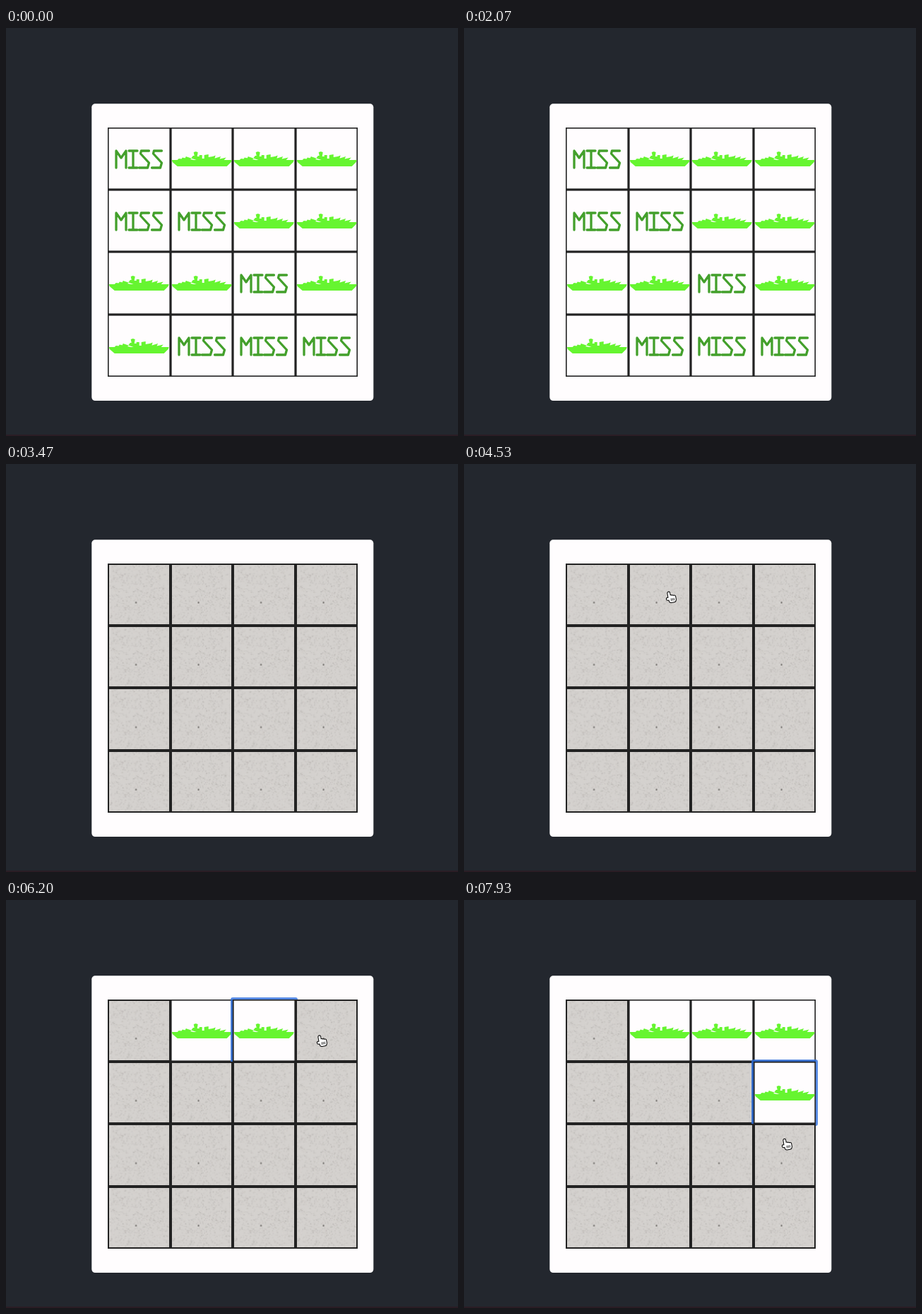
Write an HTML page with a canvas that moves like this. It is 640 by 578 pixels and loops after 8 s.

```html
<!DOCTYPE html>
<html lang="en">
<head>
<meta charset="utf-8">
<title>Battleship board</title>
<style>
  html, body { margin: 0; width: 100%; height: 100%; overflow: hidden; background: #23272e; }
  canvas { display: block; }
</style>
</head>
<body>
<canvas id="stage" width="640" height="578"></canvas>
<script>
const ctx = document.getElementById('stage').getContext('2d');
const LOOP = 8000, FPS = 15;
const LEFT = 144.4, TOP = 140.6, PITCH = 88.4, BORDER = 1.6;
const WHITE = '#fffdfe';

// M = miss, S = ship
const BOARD = ['MSSS', 'MMSS', 'SSMS', 'SMMM'];

// Tiles are uncovered at a steady rhythm along the top row, then down
const COVER_AT = 3460, FIRST_CLICK = 4795, CLICK_GAP = 733;
const ROUTE = ['0,1', '0,2', '0,3', '1,3'];
const clickTime = i => FIRST_CLICK + i * CLICK_GAP;

// The pointer enters, settles on a tile, then glides on after each click
const ENTER_AT = 3920, SETTLE_AT = 4300, GLIDE = 230, PAUSE = 150;
const STOPS = [[183, 7], [358, 195], [286, 181], [341, 194], [440, 192], [449, 266], [450, 338.5]];
const DEPARTURES = [ENTER_AT, SETTLE_AT, ...ROUTE.map((_, i) => clickTime(i) + PAUSE)];

function makeShip() {
  const hull = 'M0 12 H85 L84 15 L78 21 H8 L1 15 Z ';
  const bridge = 'M26 12 L30 6 H32 L31 1 L34 0 L37 1 L36 7 H39 V5 H43 V10 H46 V5 L52 4 V8 L58 7 V12 Z ';
  let guns = '';
  for (let i = 0; i < 3; i++) {
    guns += `M${45 + 8 * i} 12 L${62 + 7.5 * i} ${5.5 + 1.5 * i} L${60 + 7 * i} 12 Z `;
    guns += `M${35 - 4 * i} 12 L${20 - 5 * i} ${7 + 1.5 * i} L${18 - 5 * i} 12 Z `;
  }
  return new Path2D(hull + bridge + guns);
}

function makeMiss() {
  const letterS = x => `M${x + 14} 33 H${x + 3} L${x + 2} 37 L${x + 14} 50 L${x + 12} 57 H${x} `;
  return new Path2D('M12 57 V33 L19 43 L26 33 V57 M30 33 H42 M36 33 V57 M30 57 H42 ' +
    letterS(44.5) + letterS(62.5));
}

function makeHand() {
  const path = new Path2D();
  path.roundRect(2, 1, 2.8, 11, 1.4);
  for (let i = 0; i < 3; i++) path.roundRect(4.3 + 2.4 * i, 6 + .7 * i, 2.8, 7, 1.4);
  path.roundRect(2.5, 9, 9, 7, 2.5);
  path.roundRect(-.8, 9, 4.5, 3, 1.4);
  return path;
}

function makeConcrete() {
  const size = 86, tile = document.createElement('canvas');
  tile.width = tile.height = size;
  const c = tile.getContext('2d');
  let seed = 7;
  const random = () => (seed = seed * 16807 % 2147483647) / 2147483647;
  c.fillStyle = '#d4d1ce';
  c.fillRect(0, 0, size, size);
  for (let i = 0; i < 1500; i++) {
    const tone = random() < .5 ? '125,121,118' : '226,223,220';
    c.fillStyle = `rgba(${tone},${.04 + random() * .14})`;
    c.fillRect(random() * size, random() * size, 1 + random(), 1 + random());
  }
  c.fillStyle = '#666360';
  c.fillRect(37.5, 53.5, 2, 2);
  return tile;
}

const ship = makeShip(), miss = makeMiss(), hand = makeHand(), concrete = makeConcrete();
const arrow = new Path2D('M1 1 V14 L4 11 L6 16 L8 15 L6 10.5 H10.5 Z');

function at(x, y, draw) {
  ctx.save();
  ctx.translate(x, y);
  draw();
  ctx.restore();
}

function drawCell(row, col, open, focused) {
  const edge = (origin, index) => Math.round(origin + index * PITCH);
  const x = edge(LEFT, col), y = edge(TOP, row);
  const w = edge(LEFT, col + 1) - x, h = edge(TOP, row + 1) - y;
  const inner = [x + BORDER, y + BORDER, w - 2 * BORDER, h - 2 * BORDER];
  ctx.fillStyle = '#222';
  ctx.fillRect(x, y, w, h);
  if (!open) {
    ctx.drawImage(concrete, ...inner);
  } else {
    ctx.fillStyle = WHITE;
    ctx.fillRect(...inner);
    if (BOARD[row][col] === 'S') {
      ctx.fillStyle = '#66f530';
      at(x + 1.7, y + 34, () => ctx.fill(ship));
    } else {
      ctx.strokeStyle = '#43a02b';
      ctx.lineWidth = 3.3;
      ctx.lineJoin = ctx.lineCap = 'round';
      at(x, y, () => ctx.stroke(miss));
    }
  }
  if (focused) {
    ctx.strokeStyle = 'rgba(45,110,220,.8)';
    ctx.lineWidth = 3;
    ctx.beginPath();
    ctx.roundRect(x - 1.5, y - 1.5, w + 3, h + 3, 1.5);
    ctx.stroke();
  }
}

function drawPointer(t) {
  let [x, y] = STOPS[0];
  DEPARTURES.forEach((depart, i) => {
    const p = Math.min(1, Math.max(0, (t - depart) / GLIDE));
    const ease = p * p * (3 - 2 * p);
    x += (STOPS[i + 1][0] - STOPS[i][0]) * ease;
    y += (STOPS[i + 1][1] - STOPS[i][1]) * ease;
  });
  const onBoard = y > TOP;
  at(x, y, () => {
    const shape = onBoard ? hand : arrow;
    if (onBoard) ctx.rotate(-.17);
    ctx.lineJoin = 'round';
    ctx.lineWidth = 2;
    ctx.strokeStyle = onBoard ? '#000' : '#fff';
    ctx.fillStyle = onBoard ? '#fff' : '#000';
    ctx.stroke(shape);
    ctx.fill(shape);
    if (onBoard) {
      ctx.fillStyle = '#000';
      for (let i = 0; i < 3; i++) ctx.fillRect(5 + 2 * i, 10.5, .8, 3.5);
    }
  });
}

function render(t) {
  ctx.fillStyle = '#23272e';
  ctx.fillRect(0, 0, 640, 578);
  ctx.fillStyle = '#2a1d25';
  ctx.fillRect(0, 576, 640, 2);
  ctx.fillStyle = WHITE;
  ctx.beginPath();
  ctx.roundRect(121.3, 107.3, 399, 420.8, 5);
  ctx.fill();

  const opened = ROUTE.filter((_, i) => clickTime(i) <= t);
  const focus = opened[opened.length - 1];
  for (let row = 0; row < 4; row++) {
    for (let col = 0; col < 4; col++) {
      const key = row + ',' + col;
      drawCell(row, col, t < COVER_AT || opened.includes(key), key === focus);
    }
  }
  if (t >= ENTER_AT) drawPointer(t);
}

const start = performance.now();
function tick() {
  const t = (performance.now() - start) % LOOP;
  // The picture advances in whole steps of 1/15 s
  render(Math.ceil(Math.floor((t + 4) * FPS / 1000) * 1000 / FPS));
  requestAnimationFrame(tick);
}
tick();
</script>
</body>
</html>
```
